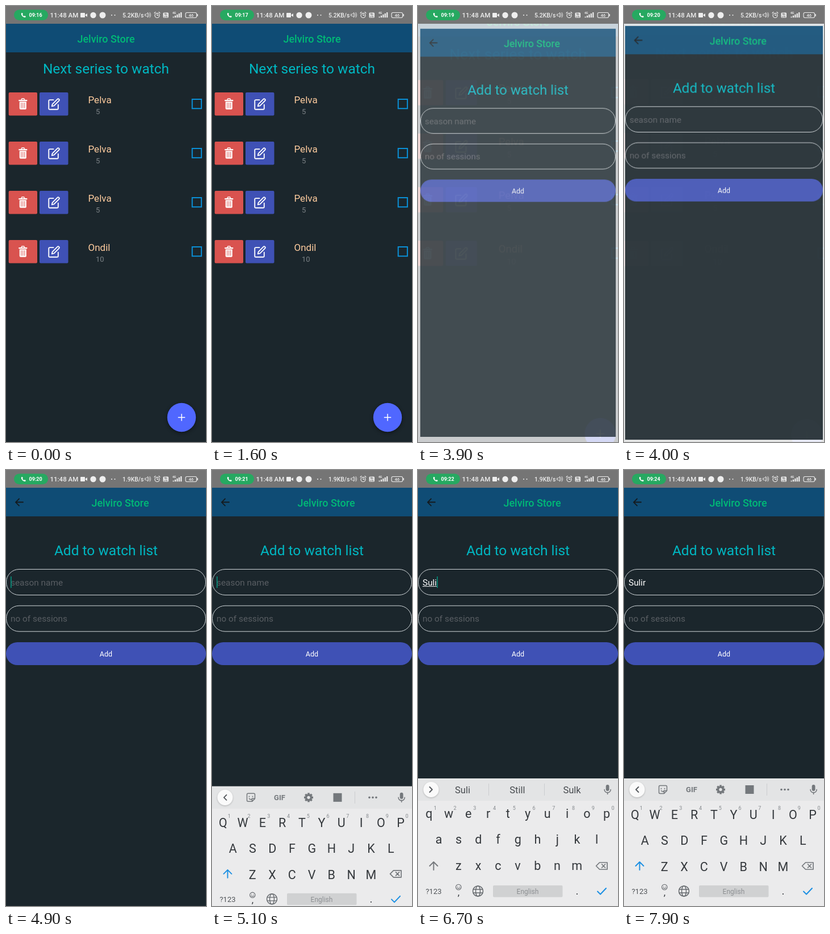
An HTML page with a canvas for the animation above (8000 ms loop, 352 by 762 pixels).

```html
<!DOCTYPE html>
<html lang="en">
<head>
<meta charset="utf-8">
<title>Watch list</title>
<style>
html, body { margin: 0; width: 100%; height: 100%; overflow: hidden; background: #1b262c; }
canvas { display: block; width: 100vw; height: 100vh; }
</style>
</head>
<body>
<canvas id="stage"></canvas>
<script>
const W = 352, H = 762, LOOP = 8000, TOP = 31, MID_Y = 396.5;
const BG = '#1b262c', BAR = '#0f4c75', CYAN = '#00b7c2', GREEN = '#00b976', BLUE = '#3f51b5';
const KEY = '#34383c', GREY = '#74787c', ACCENT = '#1a8fe3';
const APP = 'Jelviro Store', WORD = 'Sulir';
const SHOWS = [['Pelva', 5], ['Pelva', 5], ['Pelva', 5], ['Ondil', 10]];
const HINTS = [[], ['S', 'A', 'So'], ['Su', 'Sun', 'Sum'], ['Sul', 'Sulk', 'Sum'], ['Suli', 'Still', 'Sulk'], [WORD, 'Stir', 'Sulk']];
const PRESS = [5400, 5710, 6150, 6450, 6750], RELEASE = [5550, 5910, 6300, 6600, 6900];
const SPACE_DOWN = 7000, DONE = 7100;
const TICKS = [900, 2000, 3000, 4000, 5000, 5800, 6900, 7800];
const ROWS = [['qwertyuiop', 19.3, 601], ['asdfghjkl', 36.7, 646], ['zxcvbnm', 71.3, 692]];
const PITCH = 34.75;

const dpr = window.devicePixelRatio || 1;
const stage = document.getElementById('stage');
const buffer = document.createElement('canvas');
for (const c of [stage, buffer]) { c.width = Math.round(W * dpr); c.height = Math.round(H * dpr); }
const main = stage.getContext('2d'), back = buffer.getContext('2d');
let g = main;

const clamp = v => Math.max(0, Math.min(1, v));

function rect(x, y, w, h, color) { g.fillStyle = color; g.fillRect(x, y, w, h); }

function round(x, y, w, h, r, color, line) {
  g.beginPath();
  g.roundRect(x, y, w, h, r);
  paint(color, line);
}

function paint(color, line) {
  if (line) { g.strokeStyle = color; g.lineWidth = line; g.stroke(); }
  else { g.fillStyle = color; g.fill(); }
}

function disc(x, y, r, color, line) {
  g.beginPath();
  g.arc(x, y, r, 0, 7);
  paint(color, line);
}

function path(d, x, y, s, color, line) {
  g.save();
  g.translate(x, y);
  g.scale(s, s);
  const p = new Path2D(d);
  g.lineCap = g.lineJoin = 'round';
  if (line) { g.strokeStyle = color; g.lineWidth = line; g.stroke(p); }
  else { g.fillStyle = color; g.fill(p, 'evenodd'); }
  g.restore();
}

function text(s, x, y, size, color, align = 'left', weight = 400) {
  g.font = `${weight} ${size}px Roboto, sans-serif`;
  g.textAlign = align;
  g.fillStyle = color;
  g.fillText(s, x, y);
}

function statusBar(t) {
  const ink = '#eeeeee';
  rect(0, 0, W, TOP, '#757575');
  round(14, 6.5, 60, 18.5, 9.2, '#26a961');
  path('M0 1Q1 -.5 2.2 .8L3 2.6L2 3.8Q3 5.6 4.8 6.5L6 5.5L7.8 6.4Q8.8 7.7 7.4 8.6C4 9.6 -1.4 4 0 1Z', 27, 11.7, 0.95, '#fff');
  text('09:' + (16 + TICKS.filter(k => t >= k).length), 40.5, 19.2, 9, '#fff', 'left', 700);
  text('11:48 AM', 77.5, 20, 11.5, ink, 'left', 500);
  round(131, 12, 8, 8, 1, ink);
  path('M8.5 3.5L12 1V7L8.5 4.5Z', 131, 12, 1, ink);
  disc(153.5, 16, 5.2, ink);
  disc(170, 16, 5.5, ink);
  disc(186, 16, 1, ink);
  disc(191.5, 16, 1, ink);
  text((t < 4400 ? '5.2' : '1.9') + 'KB/s', 205, 19.5, 10.4, ink, 'left', 500);
  path('M0 4H2L5 1V10L2 7H0ZM7 3Q9 5.5 7 8M8.5 1Q12 5.5 8.5 10', 245, 10.5, 0.95, ink, 1);
  disc(266, 16.5, 4, ink, 1.2);
  path('M5 3V6H7M0 2L2 0M8 0L10 2', 261, 10.5, 1, ink, 1.1);
  round(276.5, 11.5, 9.5, 9, 1.5, ink);
  text('Vo', 281.2, 15.7, 4.5, '#666', 'center', 700);
  text('LTE', 281.2, 19.8, 4, '#666', 'center', 700);
  text('4G', 293, 14.2, 5, ink, 'left', 700);
  for (let i = 0; i < 5; i++) rect(293.5 + i * 3.4, 18.6 - i * 1.9, 2.2, 1.6 + i * 1.9, ink);
  round(316, 11.5, 19.5, 9, 2.5, ink, 1.1);
  rect(336.3, 14, 1.5, 4, ink);
  text('46', 325.7, 18.8, 7.5, ink, 'center', 500);
}

function trash(x, y) {
  round(x - 7.5, y - 7, 15, 2.3, 0.6, '#fff');
  path('M-3 -7L-2 -9H2L3 -7', x, y, 1, '#fff', 1.4);
  round(x - 6, y - 3.8, 12, 13.5, [0, 0, 1.8, 1.8], '#fff');
  for (const dx of [-3, 0, 3]) rect(x + dx - 0.5, y - 2, 1, 9.5, '#d9534f');
}

function home(press) {
  rect(0, TOP, W, H - TOP, BG);
  rect(0, TOP, W, 50, BAR);
  text(APP, 176, 63.5, 18, GREEN, 'center', 500);
  text('Next series to watch', 176, 117.5, 24.5, CYAN, 'center');
  SHOWS.forEach(([name, count], i) => {
    const y = 171 + i * 86;
    round(4.7, y - 20, 50.3, 40.5, 2, '#d9534f');
    round(59, y - 20, 50.5, 40.5, 2, BLUE);
    trash(29.8, y);
    path('M11 4H4a2 2 0 0 0-2 2v14a2 2 0 0 0 2 2h14a2 2 0 0 0 2-2v-7M18.5 2.5a2.121 2.121 0 0 1 3 3L12 15l-4 1 1-4 9.5-9.5z',
      73.4, y - 10.5, 0.92, '#fff', 2);
    text(name, 144.5, y - 1.5, 17, '#fdcb9e');
    text(count, 158, y + 17.5, 13, '#7c8286');
    g.strokeStyle = '#0a8fd6';
    g.lineWidth = 2;
    g.strokeRect(327.7, y - 8, 16.2, 16.2);
  });
  g.save();
  g.shadowColor = 'rgba(0,0,0,.45)';
  g.shadowBlur = 6 * dpr;
  g.shadowOffsetY = 2 * dpr;
  disc(309, 719, 25.2, '#5067ff');
  g.restore();
  rect(302.8, 718.3, 12.4, 1.5, '#fff');
  rect(308.3, 712.8, 1.5, 12.4, '#fff');
  if (press) rect(283.8, 694, 50.4, 50, `rgba(255,255,255,${0.33 * press})`);
}

function field(y, value, hint) {
  round(0.5, y + 0.5, W - 1, 45, 22.5, '#cfd5d8', 1);
  text(value || hint, 8, y + 28.5, 15.4, value ? '#fff' : '#595e63');
}

function form(t) {
  const n = RELEASE.filter(k => t >= k).length, typed = WORD.slice(0, n);
  rect(0, TOP, W, H - TOP, BG);
  rect(0, TOP, W, 50, BAR);
  path('M14 6H1M7 0L1 6L7 12', 16, 50.3, 1, '#141b20', 1.9);
  text(APP, 201, 63.5, 18, GREEN, 'center', 500);
  text('Add to watch list', 176, 149, 24.5, CYAN, 'center');
  field(173, typed, 'season name');
  field(236.7, '', 'no of sessions');
  round(0, 301, W, 40, 20, BLUE);
  text('Add', 176, 325.6, 12.5, '#fff', 'center');

  g.font = '400 15.4px Roboto, sans-serif';
  let w = g.measureText(typed).width;
  if (n && t < DONE) rect(8, 203, w, 1, '#e4e7e8');
  if (t >= DONE) w += g.measureText(' ').width;
  const last = Math.max(...[4800, ...RELEASE, DONE].filter(k => k <= t));
  if (t >= 4800 && (t - last) % 1000 < 500) rect(8 + w, 186, 1.8, 20, '#078674');
}

function tools() {
  const x = 68.5, y = 558.5;
  path('M-5 -7H5Q7 -7 7 -5V2L2 7H-5Q-7 7 -7 5V-5Q-7 -7 -5 -7ZM2 7V2H7M-3 -2V-1M3 -2V-1M-3 2Q0 5 2 2', x, y, 1, GREY, 1.5);
  text('GIF', 119, 563, 13, GREY, 'center', 700);
  for (let i = 0; i < 8; i++) {
    g.save();
    g.translate(170, y);
    g.rotate(i * Math.PI / 4);
    rect(-1.8, -8, 3.6, 5, GREY);
    g.restore();
  }
  disc(170, y, 4.5, GREY, 3.6);
  rect(213.5, 551, 15, 15, GREY);
  rect(251, 548, 1, 21, '#cbcdcf');
  for (const d of [-6, 0, 6]) disc(283 + d, y, 1.8, GREY);
}

function keyPos(ch) {
  for (const [letters, x, y] of ROWS) {
    const i = letters.indexOf(ch.toLowerCase());
    if (i >= 0) return [x + i * PITCH, y];
  }
}

function keyboard(t) {
  const rise = 1 - Math.pow(1 - clamp((t - 4950) / 250), 3);
  if (!rise) return;
  const n = RELEASE.filter(k => t >= k).length;
  const upper = n === 0 || t >= DONE;
  g.save();
  g.translate(0, 223 * (1 - rise));
  rect(0, 539, W, 223, '#ebebec');
  rect(0, 539, W, 39, '#e3e4e5');
  g.save();
  g.shadowColor = 'rgba(0,0,0,.22)';
  g.shadowBlur = 3 * dpr;
  g.shadowOffsetY = dpr;
  disc(23, 558.5, 13.6, '#fafafa');
  g.restore();
  path(upper ? 'M2.5 -4.5L-2 0L2.5 4.5' : 'M-2.5 -4.5L2 0L-2.5 4.5', 23, 558.5, 1, '#55595d', 1.9);
  if (upper) tools();
  else {
    HINTS[n].forEach((s, i) => text(s, 78.5 + i * 96.3, 565, 16.5, '#484c50', 'center'));
    for (const x of [124, 222]) rect(x, 548, 1, 21, '#cbcdcf');
  }
  round(330.7, 550, 5.8, 11, 2.9, GREY);
  path('M-5.5 0C-5.5 7 5.5 7 5.5 0M0 5V8', 333.6, 558.5, 1, GREY, 1.6);

  ROWS.forEach(([letters, x, y], r) => [...letters].forEach((ch, i) => {
    const kx = x + i * PITCH;
    text(upper ? ch.toUpperCase() : ch, kx, y + (upper ? 9 : 7), 21.5, KEY, 'center');
    if (r === 0) text((i + 1) % 10, kx + 11, 594, 9, '#85898d', 'center');
  }));

  const up = 'M0 -7L-7 0M0 -7L7 0M0 -7V7';
  path(up, 27.5, 692, 1, upper ? ACCENT : GREY, 1.9);
  path('M-4 -6H9.5V6H-4L-10 0ZM0 -3L6 3M6 -3L0 3', 323.5, 692, 1, GREY, 1.7);
  text('?123', 27.5, 741, 13, '#505458', 'center');
  disc(71.3, 729, 4.7, '#606468', 1.1);
  path('M-1.8 -1.3V-1M1.8 -1.3V-1M-2.4 1.2Q0 3.5 2.4 1.2', 71.3, 729, 1, '#606468', 1.1);
  text(',', 71.3, 743.5, 17, KEY, 'center');
  disc(105.5, 736, 9, '#65696d', 1.5);
  g.beginPath();
  g.ellipse(105.5, 736, 4, 9, 0, 0, 7);
  paint('#65696d', 1.4);
  path('M-8 -3H8M-8 3H8', 105.5, 736, 1, '#65696d', 1.4);
  const held = t >= SPACE_DOWN && t < DONE;
  round(132, 726, 122.5, 20.5, 2, held ? '#b9babc' : '#d0d1d2');
  text('English', 193, 741, 12, '#8c8f92', 'center');
  text('.', 280, 742, 19, KEY, 'center');
  path('M-7.5 0L-2.5 5L7.5 -5.5', 323.5, 736.5, 1, ACCENT, 2);

  const k = PRESS.findIndex((p, i) => t >= p && t < RELEASE[i]);
  if (k >= 0) popup(WORD[k]);
  g.restore();
}

function popup(ch) {
  const [x, y] = keyPos(ch);
  g.save();
  g.shadowColor = 'rgba(0,0,0,.4)';
  g.shadowBlur = 3 * dpr;
  g.shadowOffsetY = dpr;
  round(x - 17, y - 81, 34.2, 100, 3, '#fcfcfc');
  g.restore();
  text(ch, x, y - 46, 25, KEY, 'center');
  for (const d of [-3, 0, 3]) disc(x + 8.5 + d, y - 36, 0.8, '#55595d');
}

// Draws a whole screen off stage, then blends it in scaled about the centre.
function layer(draw, scale, alpha) {
  g = back;
  g.setTransform(dpr, 0, 0, dpr, 0, 0);
  g.clearRect(0, 0, W, H);
  draw();
  g = main;
  g.save();
  g.globalAlpha = alpha;
  g.translate(W / 2, MID_Y);
  g.scale(scale, scale);
  g.drawImage(buffer, -W / 2, -MID_Y, W, H);
  g.restore();
}

function render(t) {
  g = main;
  g.setTransform(dpr, 0, 0, dpr, 0, 0);
  if (t < 3900) home(clamp((t - 3450) / 200));
  else if (t < 4200) {
    const k = Math.pow(1 - (t - 3900) / 300, 2);
    rect(0, 0, W, H, '#f2f2f2');
    layer(() => home(0), 1.1 - 0.012 * k, 0.18 * k);
    layer(() => form(t), 1 - 0.024 * k, 1 - 0.23 * k);
  } else {
    form(t);
    keyboard(t);
  }
  statusBar(t);
}

const start = performance.now();
function tick() {
  render((performance.now() - start) % LOOP);
  requestAnimationFrame(tick);
}
tick();
</script>
</body>
</html>
```
